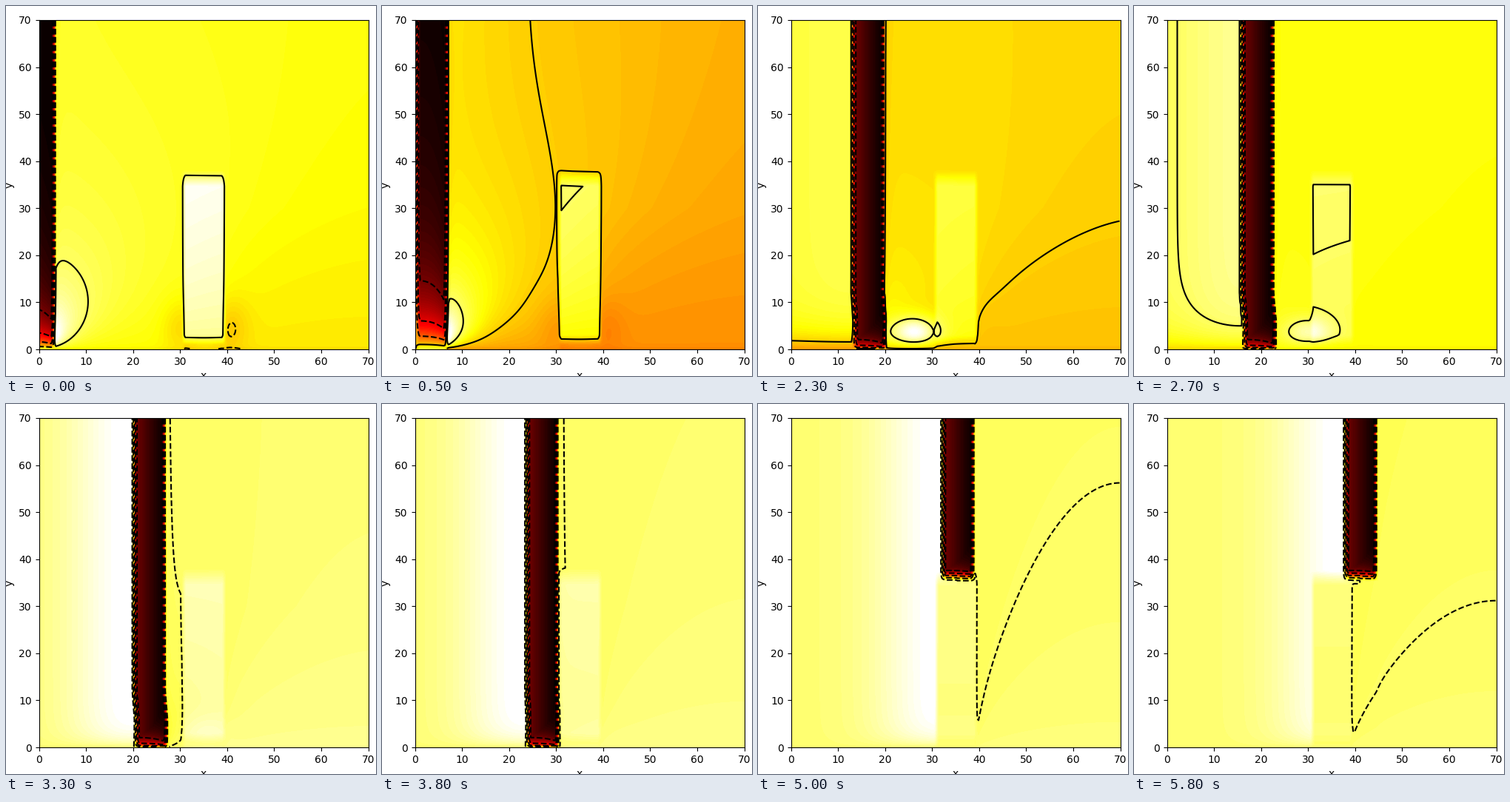
Recreate the animation shown at these times as a matplotlib script. Size 500x500 px, loop 5900 ms.

```python
import numpy as np
import matplotlib.pyplot as plt
from matplotlib.animation import FuncAnimation

FRAMES, SIZE, CELLS = 59, 70, 280
WIDTH, SPEED, START = 7.0, 0.709, 3.4         # travelling band
LEVELS = 0.162 + 0.17 * np.arange(5)          # contour heights

# Background tone ahead of the band at a few key times
TIMES = [0, 5, 14, 23, 33, 43, 58]
TONES = [.745, .61, .608, .684, .853, .839, .827]

axis = (np.arange(CELLS) + 0.5) * SIZE / CELLS
X, Y = np.meshgrid(axis, axis)


def ramp(v, a, b):
    return np.clip((v - a) / (b - a), 0, 1)


def smooth(v, a, b):
    u = ramp(v, a, b)
    return u * u * (3 - 2 * u)


def bell(v, centre, width):
    return np.exp(-((v - centre) / width) ** 2)


# Shapes that stay put: the block, its shadows and the fan behind it
SIDES = ramp(X, 30.3, 31.1) * ramp(X, 39.7, 38.9)
MASK = SIDES * ramp(Y, 38, 34.7) * ramp(Y, 1, 3)
BLOCK = MASK * (.7 + .3 * Y / 35)
OPEN = 1 - ramp(X, 30.5, 31.3) * ramp(Y, 37.5, 34.5)
SHADE = (bell(X, 30, 4) + bell(X, 40.5, 4)) * bell(Y, 5, 6) * (1 - MASK)
SHELTER = 1 - ramp(X, 39, 40) * (1 - ramp(Y, 0, 30))
REACH = np.sin(np.pi / 2 * np.clip((X - 39) / 31, 1e-6, 1)) ** .7
FAN = np.maximum(np.exp(-Y / REACH / 45) * (X > 39), SIDES * np.exp(-Y / 3))
HEIGHT = np.where(X > 30.9, np.maximum(Y - 35.5, 0), Y)


def ahead(n, tone, late, right):
    s = np.maximum(X - right, 0)
    lobe = 3 * bell(n, 8, 12) - .4 * bell(n, 33, 4)
    v = tone + SHELTER * lobe * Y / ((s + 3) ** 2 + Y ** 2)
    v += .06 * bell(n, 5, 4) * np.exp(-s / 20) * Y / SIZE
    v -= .04 * bell(n, 18, 20) * np.exp(-s / .8)
    glow = bell(X, right + 2 + .2 * n, 4.8) * bell(Y, 3.4, 3.3)
    v += .36 * bell(n, 20, 8) * glow * np.tanh(Y / 2)
    v += .03 * (2 * late - 1) * FAN + .21 * np.exp(-n / 34) * BLOCK
    return v - .06 * np.exp(-n / 9) * SHADE - .03 * (1 - late) * np.exp(-Y / .4)


def behind(late, left):
    trail = bell(np.maximum(left - X, 0), 0, 14) * (1 - np.exp(-Y / 2))
    return (.79 + .065 * late + (.03 + .12 * late) * trail
            - .2 * (1 - late) * np.exp(-Y / 4))


def inside(n, left):
    u = ramp(X, left, left + WIDTH)
    depth = (.8 + 5 * bell(n, 4, 5)) * (1 - .4 * u ** 3)
    root = .85 / (1 + HEIGHT / depth) ** 1.2 - .02
    return np.maximum(root, .18 * ramp(n, 5, 14) * (1 - u) ** 1.2)


def field(n, tone):
    late = smooth(n, 23, 33)
    right = START + SPEED * n
    left = right - WIDTH
    front = ahead(n, tone, late, right)
    passed = (X < (left + right) / 2) * OPEN
    outer = front + (behind(late, left) - front) * passed
    x = X - .6 * bell(n, 28, 10) * ramp(Y, 12, 6)
    band = (ramp(x, left - .2, left + 1) * ramp(x, right + .2, right - .7)
            * OPEN)
    return np.clip(outer + (inside(n, left) - outer) * band, 0, 1)


fig = plt.figure(figsize=(5, 5), dpi=100)
ax = fig.add_axes([.089, .072, .89, .89])
image = ax.imshow(np.zeros_like(X), origin="lower", extent=(0, SIZE, 0, SIZE),
                  cmap=plt.get_cmap("hot", 100), vmin=0, vmax=1,
                  interpolation="bilinear", aspect="auto")
ax.set(xlim=(0, SIZE), ylim=(0, SIZE), xlabel="x", ylabel="y")
lines = []


def draw(n):
    while lines:
        lines.pop().remove()
    tone = np.interp(n, TIMES, TONES)
    v = field(n, tone)
    image.set_data(v)
    # levels below zero are dashed; zero drifts with the background tone
    zero = 1.6 * tone - .43
    styles = ["dashed" if level < zero else "solid" for level in LEVELS]
    lines.append(ax.contour(X, Y, v, levels=LEVELS, colors="k",
                            linewidths=1.5, linestyles=styles))
    return [image]


anim = FuncAnimation(fig, draw, frames=FRAMES, interval=100, repeat=True)
plt.show()
```
